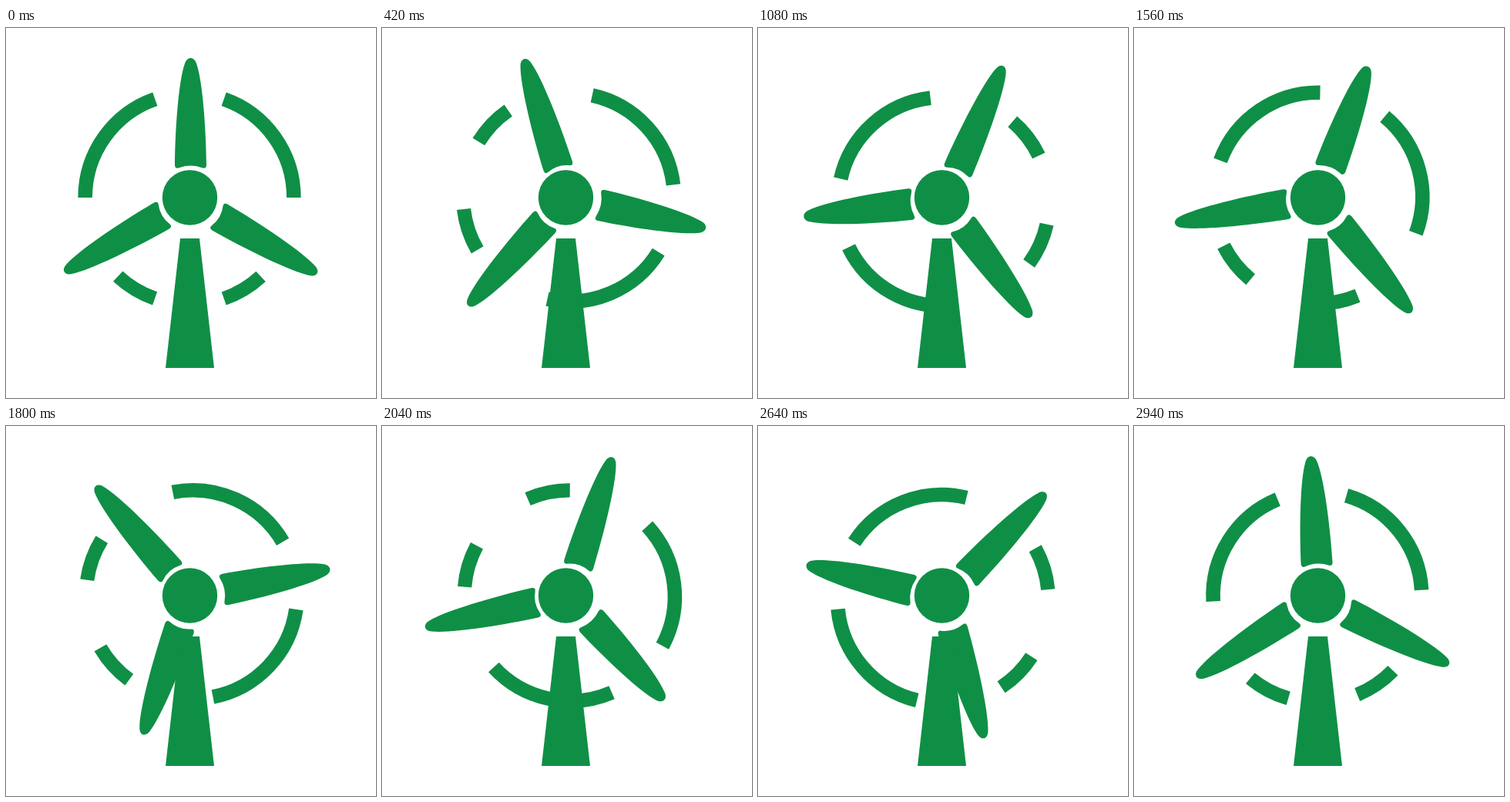
Animation, 480 px wide and 480 px high, one loop 3 s. Source, as an HTML page:

```html
<!DOCTYPE html>
<html lang="en">
<head>
<meta charset="utf-8">
<title>Wind turbine</title>
<style>
  html, body { margin: 0; width: 100%; height: 100%; overflow: hidden; background: #fff; }
  svg { display: block; width: 100vw; height: 100vh; }
  .ring { fill: none; stroke: #0f8f46; }
</style>
</head>
<body>
<svg viewBox="0 0 480 480" fill="#0f8f46">
  <defs>
    <!-- blade pointing up, hub centre at 0,0 -->
    <path id="blade" d="M-20.5 -42C-20 -90 -15.5 -152 -7.5 -174C-4.5 -183.3 4.5 -183.3 7.5 -174C15.5 -152 20 -90 20.5 -42Q20 -37 15.5 -38.5Q0 -44.5 -15.5 -38.5Q-20 -37 -20.5 -42Z"/>
  </defs>
  <g id="rotor">
    <circle class="ring" r="135.3" stroke-width="18.6" pathLength="360"
      stroke-dasharray="70.7 38.6 70.7 180" transform="translate(238 220) rotate(180)"/>
    <circle class="ring" r="136.5" stroke-width="18.2" pathLength="360"
      stroke-dasharray="23.6 38.3 23.6 274.5" transform="translate(238 222) rotate(47.3)"/>
    <use href="#blade" transform="translate(239.5 220)"/>
    <use href="#blade" transform="translate(239.1 223.4) rotate(120) scale(.96 1.05)"/>
    <use href="#blade" transform="translate(240.2 221.5) rotate(240) scale(.96 1.05)"/>
  </g>
  <path d="M226 273H251L270 441H207Z"/>
  <circle cx="238.5" cy="220" r="35.7"/>
</svg>
<script>
  const LOOP = 3000, STEP = 60, TURN = 14.63; // ms, ms, degrees per step
  const rotor = document.getElementById('rotor');
  const start = performance.now();

  function draw() {
    const step = Math.floor((performance.now() - start) % LOOP / STEP);
    rotor.setAttribute('transform', `rotate(${step * TURN} 241 222)`);
    requestAnimationFrame(draw);
  }
  draw();
</script>
</body>
</html>
```
